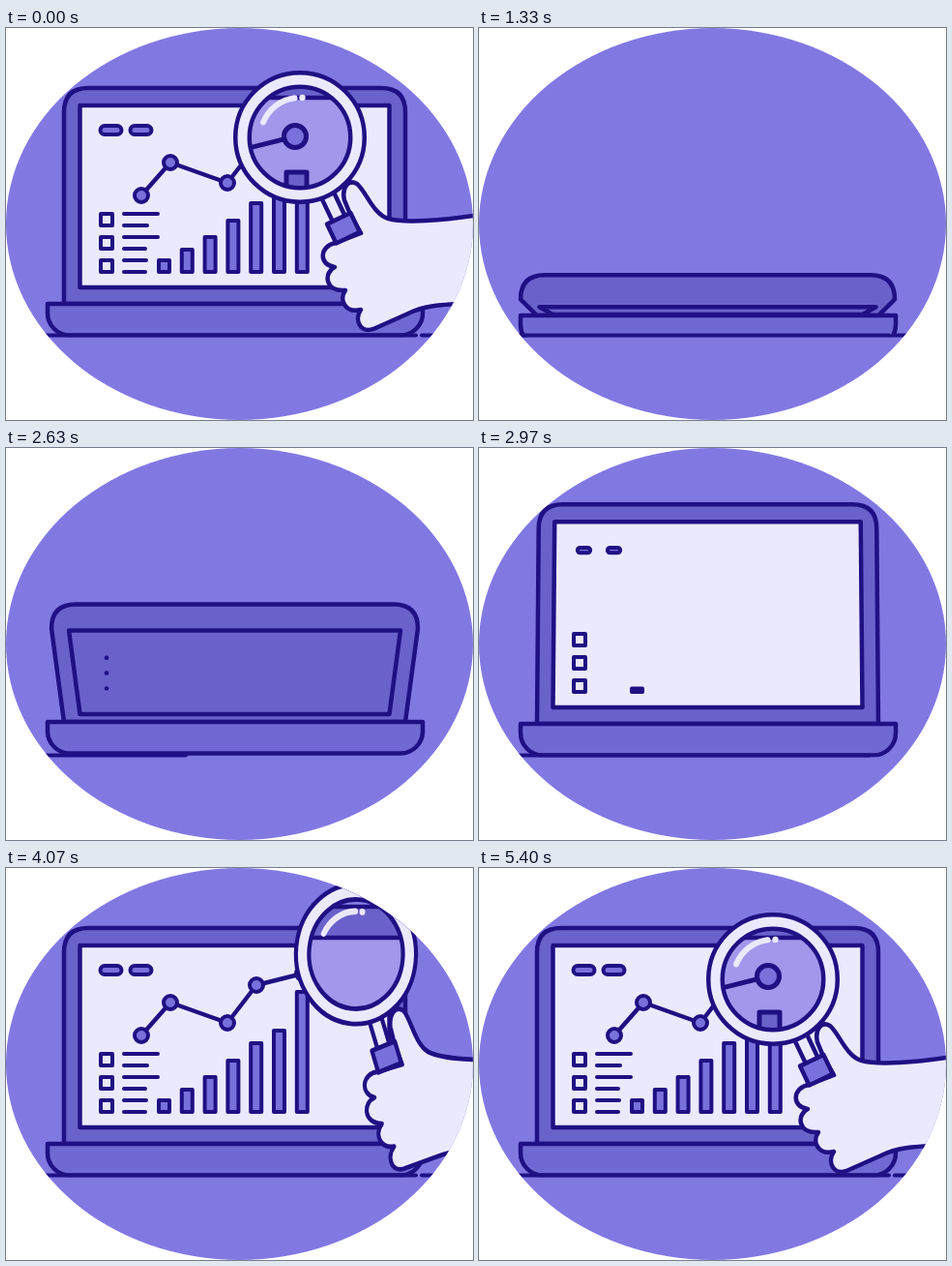
An HTML page with a canvas that plays this animation: 483 px wide and 405 px high, repeating every 5.43 s.

```html
<!DOCTYPE html>
<html lang="en">
<head>
<meta charset="utf-8">
<title>Chart under a magnifier</title>
<style>
html, body { margin: 0; width: 100%; height: 100%; overflow: hidden; background: #fff; }
canvas { display: block; width: 483px; height: 405px; }
</style>
</head>
<body>
<canvas id="stage" width="483" height="405"></canvas>
<script>
const LOOP = 5430;
const CX = 236.5;
const GROUND = 317.5;
const INK = '#1f1083', BACK = '#8178e2', LID = '#6b61cb', BASE = '#7168d4',
      ACCENT = '#7a70dc', PAPER = '#ebe9fe', GLASS = '#a198ec';
const g = document.getElementById('stage').getContext('2d');

const clamp = v => Math.min(1, Math.max(0, v));
const ramp = (t, a, b) => clamp((t - a) / (b - a));
const smooth = (t, a, b) => { const u = ramp(t, a, b); return u * u * (3 - 2 * u); };

// Monotone cubic interpolation through rows of [time, ...values].
function track(rows) {
  const slope = (i, c) => (rows[i + 1][c] - rows[i][c]) / (rows[i + 1][0] - rows[i][0]);
  const tangent = (i, c) => {
    if (i === 0 || i === rows.length - 1) return 0;
    const a = slope(i - 1, c), b = slope(i, c);
    return a * b > 0 ? 2 * a * b / (a + b) : 0;
  };
  return t => {
    const first = rows[0], last = rows[rows.length - 1];
    if (t <= first[0]) return first.slice(1);
    if (t >= last[0]) return last.slice(1);
    const i = rows.findIndex(r => r[0] > t) - 1;
    const span = rows[i + 1][0] - rows[i][0], u = (t - rows[i][0]) / span;
    return rows[i].slice(1).map((v, k) => {
      const c = k + 1, d = 1 - u;
      return v * d * d * (1 + 2 * u) + rows[i + 1][c] * u * u * (3 - 2 * u)
        + span * (tangent(i, c) * u * d * d - tangent(i + 1, c) * u * u * d);
    });
  };
}

// time, lid top, lid half width, screen top, screen half width, screen bottom, sink
const laptopAt = track([
  [660, 62, 176.5, 80, 160, 268, 0],
  [830, 69, 178.5, 89, 160.5, 269, 0],
  [1140, 152, 189, 180, 171, 275, 0],
  [1330, 255, 193.5, 288, 174, 296, 12],
  [1600, 324, 194, 330, 175, 332, 38],
  [2370, 324, 194, 330, 175, 332, 38],
  [2500, 232, 193, 259, 174, 281, 2],
  [2630, 162, 189.5, 189, 171.5, 275, -2],
  [2800, 78, 179, 98, 162, 269, 0],
  [2920, 58, 175, 76, 158.5, 268, 0],
  [3330, 66, 174, 84, 157.5, 268, 0],
  [3560, 62, 176.5, 80, 160, 268, 0]
]);

// time, vertical scale of the screen content
const squashAt = track([[660, 1], [830, 0.917], [1100, 0.7], [2630, 0.66], [2900, 1], [3330, 0.99], [3500, 1]]);

// time, lens x, lens y, lean
const handAt = track([
  [3480, 640, 112, 1],
  [4070, 362, 89, 1],
  [4600, 352, 128, 0.75],
  [4850, 330, 133, 0.45],
  [5170, 308, 126, 0.1],
  [5400, 304, 115, 0],
  [5430, 304, 113, 0],
  [6000, 362, 89, 1],
  [6260, 361, 46, 1],
  [6540, 500, -200, 1]
]);

function paint(fill, width = 4.5) {
  if (fill) { g.fillStyle = fill; g.fill(); }
  if (width) { g.strokeStyle = INK; g.lineWidth = width; g.stroke(); }
}
function circle(x, y, r, fill, width) {
  g.beginPath();
  g.arc(x, y, r, 0, 7);
  paint(fill, width);
}
function rect(x, y, w, h, fill, width, r = 0) {
  g.beginPath();
  g.roundRect(x, y, w, h, r);
  paint(fill, width);
}
function line(points, width) {
  g.beginPath();
  points.forEach(p => g.lineTo(p[0], p[1]));
  paint(null, width);
}

const DOTS = [[140, 173], [170, 139], [229, 160], [259, 121], [307, 109]];
const TOPS = [240, 229, 216, 199, 181, 168, 128];
const ROWS = [158, 147, 158, 145, 146, 145];

function trend(t, mapY) {
  const lens = DOTS.slice(1).map((p, i) => Math.hypot(p[0] - DOTS[i][0], p[1] - DOTS[i][1]));
  let left = ramp(t, 3130, 3555) * lens.reduce((a, b) => a + b);
  if (!left) return;
  const path = [[DOTS[0][0], mapY(DOTS[0][1])]];
  lens.forEach((len, i) => {
    const u = clamp(left / len), [x, y] = DOTS[i], [X, Y] = DOTS[i + 1];
    if (u > 0) path.push([x + (X - x) * u, mapY(y + (Y - y) * u)]);
    left -= len;
  });
  line(path, 4.5);
  DOTS.forEach(([x, y], i) => {
    const s = smooth(t, 3230 + 110 * i, 3400 + 110 * i);
    if (s > 0) circle(x, mapY(y), 7 * s, ACCENT, 4);
  });
}

function bars(t, mapY) {
  TOPS.forEach((top, i) => {
    const u = (t - 3060 - 50 * i) / 400;
    if (u < -0.3) return;
    const bump = u > 0.4 && u < 1 ? 15 * Math.sin(Math.PI * (u - 0.4) / 0.6) : 0;
    const h = Math.max(9 * ramp(u, -0.3, -0.1), (252 - top) * smooth(u, 0, 0.55) + bump);
    const y = mapY(252 - h);
    rect(158 + 23.8 * i, y, 11, mapY(252) - y, ACCENT, 4);
  });
}

// Chart age keeps growing past the first pass, so the loop start shows it finished.
function content(t) {
  const age = t < 1200 ? t + LOOP : t;
  if (age < 2580) return;
  const [k] = squashAt(t);
  const mapY = y => 253 - k * (253 - y);
  g.save();
  g.globalAlpha = t < 1200 ? 1 - smooth(t, 880, 1060) : 1;
  const box = smooth(age, 2580, 2950);
  [198, 222, 246].forEach(y => {
    const w = 12 * box, h = w * k;
    if (box > 0) rect(104 - w / 2, mapY(y) - h / 2, w, h, age > 2750 ? PAPER : LID, 4);
  });
  const pill = smooth(age, 2800, 3100);
  [108.5, 139.5].forEach(x => {
    if (pill > 0) rect(x - 11 * pill, mapY(105.5) - 4.5 * k * pill, 22 * pill, 9 * k * pill, ACCENT, 4, 4.5 * k * pill);
  });
  ROWS.forEach((end, i) => {
    const u = smooth(age, 3120, 3450 + 20 * (i % 3));
    const y = mapY(192 + 12 * i);
    if (u > 0) line([[end - 1, y], [end - 1 - (end - 123) * u, y]], 4);
  });
  bars(age, mapY);
  trend(age, mapY);
  g.restore();
}

function laptop(t) {
  if (t >= 1600 && t < 2370) return;
  const [top, half, sTop, sHalf, sBottom, sink] = laptopAt(t);
  const hinge = 285 + sink;
  const r = Math.max(2, Math.min(25, hinge - top - 4));
  g.save();
  g.beginPath();
  g.rect(0, 0, 483, GROUND + 2);
  g.clip();

  g.beginPath();
  g.moveTo(CX - 176.5, hinge);
  g.lineTo(CX - half, top + r);
  g.quadraticCurveTo(CX - half, top, CX - half + 25, top);
  g.lineTo(CX + half - 25, top);
  g.quadraticCurveTo(CX + half, top, CX + half, top + r);
  g.lineTo(CX + 176.5, hinge);
  g.closePath();
  paint(LID);

  g.beginPath();
  g.moveTo(CX - sHalf, sTop);
  g.lineTo(CX + sHalf, sTop);
  g.lineTo(CX + 160, sBottom);
  g.lineTo(CX - 160, sBottom);
  g.closePath();
  paint(LID, 0);
  g.save();
  g.globalAlpha = t < 1600 ? 1 - smooth(t, 700, 980) : smooth(t, 2720, 2950);
  paint(PAPER, 0);
  g.restore();
  paint(null, 4.5);
  content(t);

  rect(43, hinge, 388, 32.5, BASE, 4.5, [0, 0, 23, 23]);
  g.restore();
}

function ground(t) {
  const from = 38 + 410 * smooth(t, 1730, 2030);
  const to = 38 + 410 * ramp(t, 2400, 3040);
  const fresh = t > 2200;
  [[38, 424], [430, 448]].forEach(([a, b]) => {
    const x0 = fresh ? a : Math.max(a, from), x1 = fresh ? Math.min(b, to) : b;
    if (x1 > x0) line([[x0, GROUND], [x1, GROUND]], 4);
  });
}

// Everything below is drawn around the lens centre.
function hand() {
  g.beginPath();
  g.moveTo(37, 109);
  g.bezierCurveTo(20, 112, 19, 132, 36, 134);
  g.bezierCurveTo(24, 140, 26, 160, 47, 158);
  g.bezierCurveTo(40, 168, 47, 182, 63, 178);
  g.bezierCurveTo(56, 188, 62, 203, 76, 198);
  g.lineTo(112, 182);
  g.bezierCurveTo(132, 172, 152, 173, 186, 171);
  g.lineTo(420, 162);
  g.lineTo(420, 60);
  g.lineTo(186, 80);
  g.bezierCurveTo(148, 86, 108, 89, 91, 84);
  g.bezierCurveTo(75, 78, 69, 57, 59, 48);
  g.bezierCurveTo(50, 43, 43, 52, 46, 65);
  g.lineTo(53, 82);
  g.lineTo(63, 99);
  g.closePath();
  paint(PAPER);
}

function handle() {
  g.save();
  g.rotate(-25.6 * Math.PI / 180);
  rect(-7, 62, 14, 32, PAPER, 4.5);
  rect(-13.5, 93, 27, 22, ACCENT, 4.5);
  g.restore();
}

function lensView(place) {
  g.save();
  g.beginPath();
  g.arc(0, 0, 52, 0, 7);
  g.clip();
  g.setTransform(1, 0, 0, 1, 0, 0);
  rect(0, -300, 483, 800, GLASS, 0);
  rect(0, -300, 483, 340, '#8a81e6', 0);
  rect(-20, 40, 523, 32, LID, 4.5);
  rect(290, 149, 21, 200, LID, 5);
  line([[215, 133], [299, 112]], 5);
  circle(299, 112, 11.5, ACCENT, 5);
  g.restore();
}

function magnifier(t) {
  const age = t < 1200 ? t + LOOP : t;
  if (age < 3480 || age > 6540) return;
  const [x, y, lean] = handAt(age);
  g.save();
  g.translate(x, y);
  g.scale(1 - 0.07 * lean, 1 + 0.08 * lean);
  g.rotate(6.5 * lean * Math.PI / 180);
  hand();
  handle();
  lensView();

  g.beginPath();
  g.arc(0, 0, 59.5, 0, 7);
  g.strokeStyle = INK;
  g.lineWidth = 19;
  g.stroke();
  g.strokeStyle = PAPER;
  g.lineWidth = 10;
  g.stroke();

  g.lineWidth = 6;
  g.beginPath();
  g.arc(0, 0, 41, 3.53, 4.58);
  g.stroke();
  circle(2.5, -41, 3.2, PAPER, 0);
  g.restore();
}

function draw(now) {
  const t = now % LOOP;
  g.setTransform(1, 0, 0, 1, 0, 0);
  g.clearRect(0, 0, 483, 405);
  g.lineCap = g.lineJoin = 'round';
  g.save();
  g.beginPath();
  g.ellipse(241.5, 202.5, 241.5, 202.5, 0, 0, 7);
  g.clip();
  rect(0, 0, 483, 405, BACK, 0);
  laptop(t);
  ground(t);
  magnifier(t);
  g.restore();
}

const start = performance.now();
function tick() {
  draw(performance.now() - start);
  requestAnimationFrame(tick);
}
tick();
</script>
</body>
</html>
```
